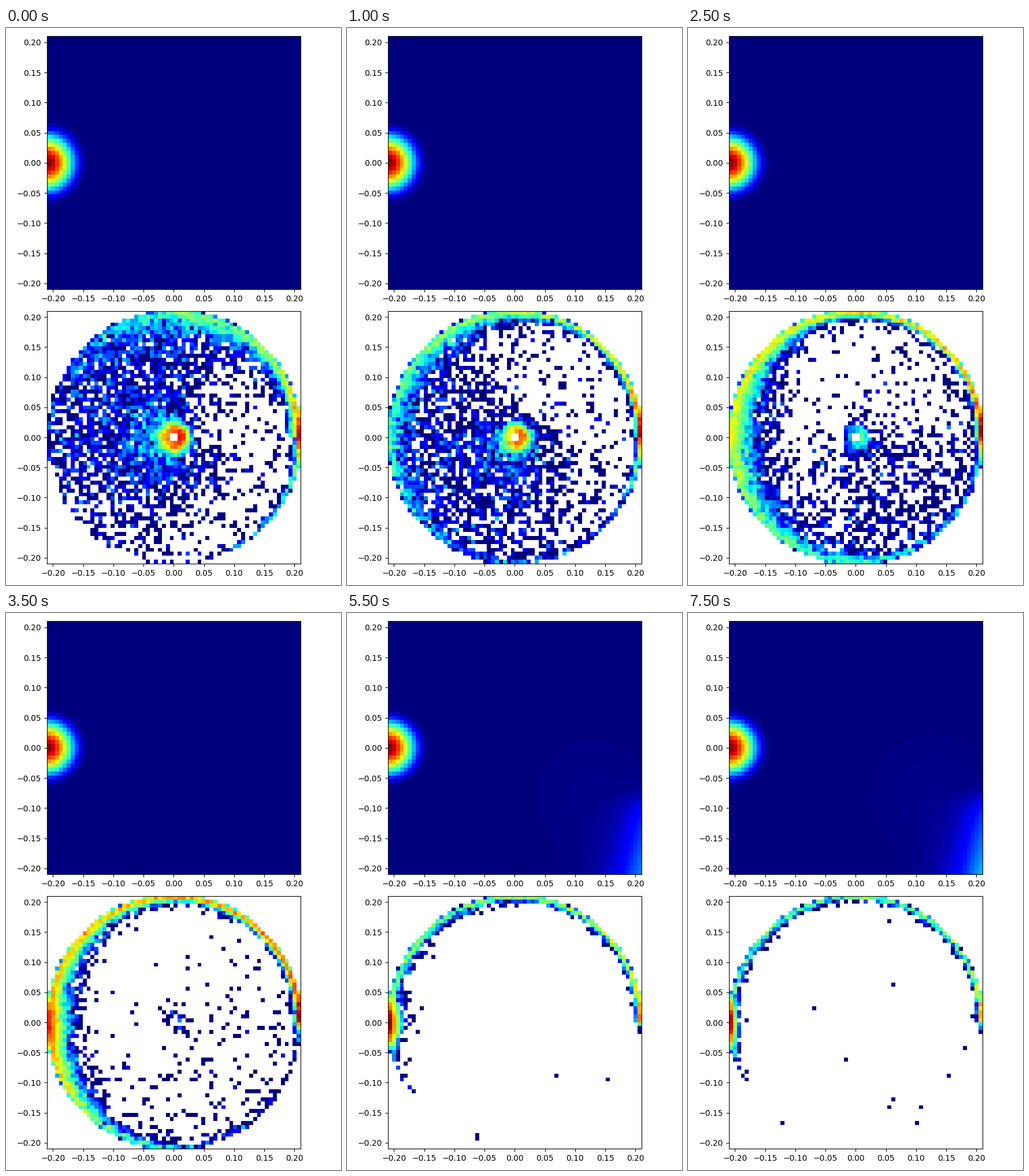
A matplotlib script that plays this animation: 580 px wide and 966 px high, repeating every 8 s.

```python
import numpy as np
import matplotlib.pyplot as plt
from matplotlib.animation import FuncAnimation
from matplotlib.colors import LogNorm

W, H, DPI = 580, 966, 100
FRAMES, STEP = 16, 500
LIM, N, SUB = 0.21, 64, 4
PEAK = 250  # count at the top of the colour scale
R = N / 2


def grid(n, half):
    c = (np.arange(n) + .5) / n * 2 * half - half
    return np.meshgrid(c, c)


def polar(n):
    x, y = grid(n, R)
    return np.hypot(x, y), np.degrees(np.arctan2(y, x)) % 360


def cosd(a):
    return np.cos(np.radians(a))


def cell_mean(a):
    return a.reshape(N, SUB, N, SUB).mean(axis=(1, 3))


X, Y = grid(N, LIM)
CELL_R, CELL_DEG = polar(N)
FINE_R, FINE_DEG = polar(N * SUB)
INSIDE = FINE_R < R
COVER = cell_mean(INSIDE)


def wall(t):
    """Layer on the rim: fills counter-clockwise, then drains from below."""
    deg = FINE_DEG
    base = np.interp(t, (0, 3.5, 5.5, 7.5), (.50, .73, .51, .46))
    hot = np.interp(t, (3.5, 5.5, 7.5), (.97, .80, .72))
    front = np.interp(t, (0, 3.5, 5.5), (85, 200, 189))
    fade = np.interp(t, (0, 1, 2.5, 3.5, 5.5), (.006, .0025, .0025, .006, .04))
    left = np.interp(t, (2.5, 3.5, 5.5), (0, .14, .48))
    drop = np.interp(t, (0, 2.5, 3.5, 5.5), (.11, .16, .26, .55))

    level = base - fade * np.maximum(deg - front, 0)
    level += (hot - base) * np.exp(-deg / 22)
    level += left * np.exp(-((deg - 180) / 10) ** 2)
    level = np.maximum(level, hot - drop * np.sqrt(360 - deg))

    thick = np.interp(t, (0, 1, 2.5, 3.5, 5.5, 7.5), (3.5, 2.2, 2.2, 1.3, .5, .15))
    bulge = np.interp(t, (0, 1.5, 5.5), (115, 195, 180))
    w = .32 + thick * np.exp(-((deg - bulge) / 68) ** 2)
    fall = np.exp(-np.maximum(R - FINE_R, 0) / w) / (w * (1 - np.exp(-1 / w)))
    return cell_mean(PEAK ** level * fall * INSIDE)


def cloud(t):
    """Thin spray, densest on one side that turns with time."""
    amount = np.interp(t, (0, 1, 2.5, 3.5, 5.5), (1.2, .9, .6, .1, .004))
    heading = min(155 + 50 * t, 285)
    side = .13 + ((1 + cosd(CELL_DEG - heading)) / 2) ** 1.5
    slope = min(.7 * t - .6, 1.5)
    spray = amount * side * np.maximum(1 + slope * (CELL_R / R - .6), .1)
    lean = .6 + .5 * cosd(CELL_DEG - heading - 55)
    return spray + 11 * np.exp(-t * t / 3) * lean * np.exp(-CELL_R / 5.5)


def core(t):
    level = .8 - .09 * t ** 1.8 + .09 * cosd(CELL_DEG)
    return PEAK ** level * np.exp(-np.maximum(CELL_R - 2.4, 0) / .65)


def counts(i):
    t = i * STEP / 1000
    mean = wall(t) + (cloud(t) + core(t)) * COVER
    mean[CELL_R < 1.2] = 0
    rng = np.random.default_rng(40 + i)
    return np.ma.masked_less(rng.poisson(mean), 1)


def field(i):
    t = i * STEP / 1000
    tall = np.interp(t, (0, 3.5), (.073, .068))
    reach = np.minimum(np.hypot((X + LIM) / .069, Y / tall), 1)
    source = np.cos(np.pi / 2 * reach) ** 2

    grow = 1.17 * (1 - np.exp(-(max(t - 3.5, 0) / 1.45) ** 1.5))
    depth = np.maximum(-.075 - Y, 0) / .135
    lobe = (.1 + .17 * depth) / (1 + np.exp((Y + .082) / .008))
    lobe *= np.exp(-((LIM - X) / (.028 + .015 * depth)) ** 1.3)
    haze = .01 * np.exp(-((X - .13) ** 2 + (Y + .08) ** 2) / .0098)
    return source + grow * (lobe + haze)


plt.rcParams["font.family"] = "DejaVu Sans"
fig = plt.figure(figsize=(W / DPI, H / DPI), dpi=DPI, facecolor="white")


def panel(top, data, **style):
    left, side = 70.9, 438.8
    ax = fig.add_axes([left / W, 1 - (top + side) / H, side / W, side / H])
    image = ax.imshow(data, origin="lower", extent=(-LIM, LIM, -LIM, LIM),
                      cmap="jet", interpolation="nearest", aspect="auto", **style)
    ticks = np.linspace(-.2, .2, 9)
    ax.set_xticks(ticks)
    ax.set_yticks(ticks)
    ax.xaxis.set_major_formatter("{x:.2f}")
    ax.yaxis.set_major_formatter("{x:.2f}")
    return image


upper = panel(14.4, field(0), vmin=0, vmax=1)
lower = panel(490.6, counts(0), norm=LogNorm(1, PEAK))


def draw(i):
    upper.set_data(field(i))
    lower.set_data(counts(i))
    return upper, lower


anim = FuncAnimation(fig, draw, frames=FRAMES, interval=STEP,
                     repeat=True, repeat_delay=0)
plt.show()
```
